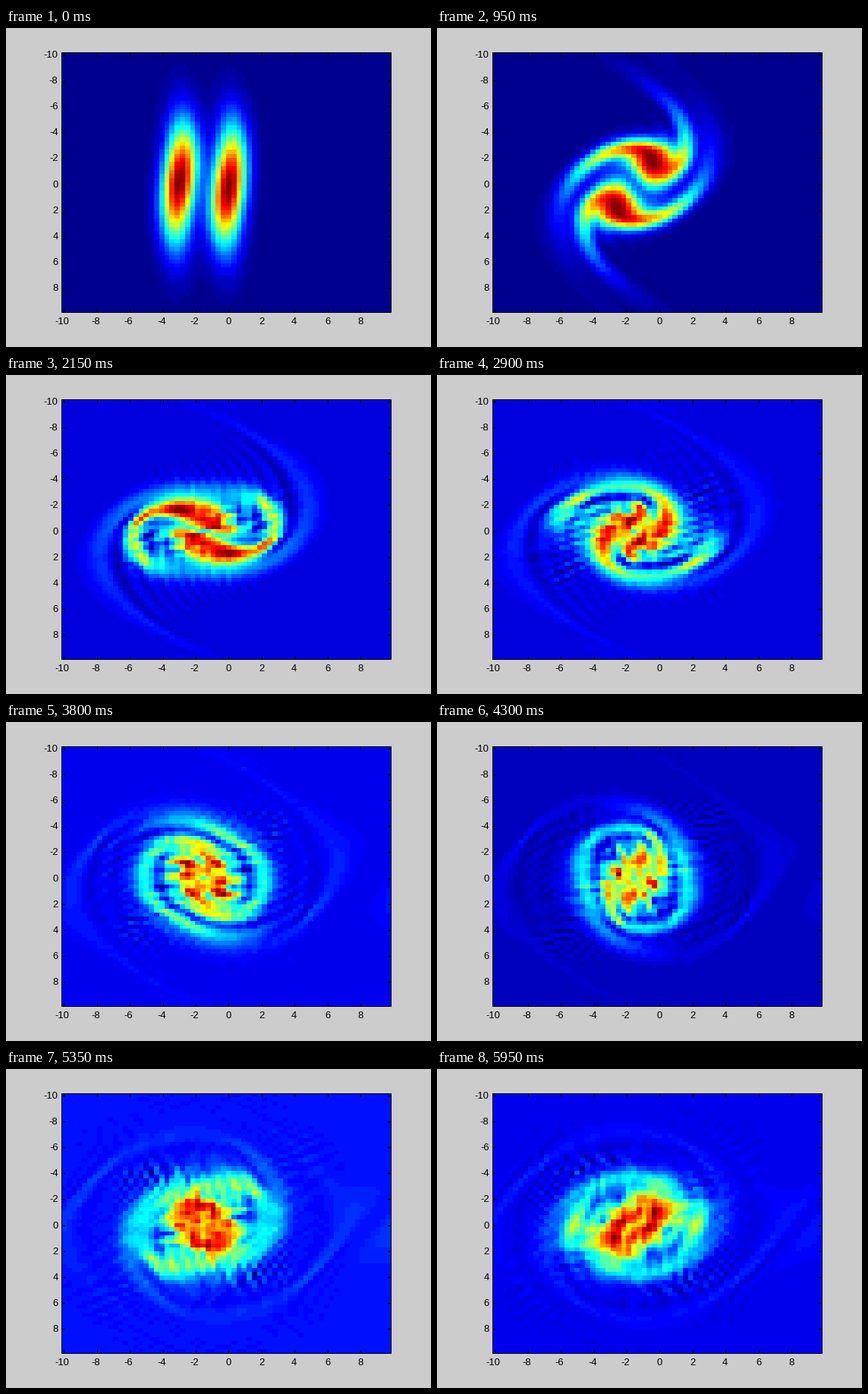
A matplotlib script that plays this animation: 560x420 px, repeating every 6 s.

```python
import numpy as np
import matplotlib.pyplot as plt
from matplotlib.animation import FuncAnimation
from matplotlib.colors import ListedColormap

W, H, DPI = 560, 420, 80
FRAMES, INTERVAL = 120, 50
PX = 72 / DPI  # points per pixel

# Vorticity equation on a periodic square
N, L, NU = 64, 20.0, 0.001
DX = L / N
DT, SUBSTEPS = 0.05, 10

grid = -L / 2 + DX * np.arange(N)
X, Y = np.meshgrid(grid, grid)

kx = 2 * np.pi * np.fft.rfftfreq(N, DX)
ky = 2 * np.pi * np.fft.fftfreq(N, DX)
k2 = kx[None, :] ** 2 + ky[:, None] ** 2
k2[0, 0] = 1.0
inv_lap = -1 / k2
inv_lap[0, 0] = 0.0


def neighbours(f):
    return (np.roll(f, -1, 1), np.roll(f, 1, 1),
            np.roll(f, -1, 0), np.roll(f, 1, 0))


def rate(w):
    psi = np.fft.irfft2(np.fft.rfft2(w) * inv_lap, s=(N, N))
    pe, pw, pn, ps = neighbours(psi)
    we, ww, wn, ws = neighbours(w)
    advect = ((pe - pw) * (wn - ws) - (pn - ps) * (we - ww)) / (4 * DX ** 2)
    return NU * (we + ww + wn + ws - 4 * w) / DX ** 2 - advect


def rk4(w):
    a = rate(w)
    b = rate(w + DT / 2 * a)
    c = rate(w + DT / 2 * b)
    d = rate(w + DT * c)
    return w + DT / 6 * (a + 2 * b + 2 * c + d)


def simulate():
    w = np.exp(-(X + 3) ** 2 - Y ** 2 / 20) + np.exp(-X ** 2 - Y ** 2 / 20)
    states = []
    for _ in range(FRAMES):
        for _ in range(SUBSTEPS):
            w = rk4(w)
        states.append(w)
    return states


def jet64():
    i = np.arange(1, 65)

    def ramp(j):
        return np.clip(np.minimum(j, 48 - j) / 16, 0, 1)

    return ListedColormap(np.column_stack([ramp(i - 24), ramp(i - 8), ramp(i + 8)]))


states = simulate()

fig = plt.figure(figsize=(W / DPI, H / DPI), dpi=DPI, facecolor="#cccccc")
ax = fig.add_axes([0, 0, 1, 1])
ax.set_axis_off()

left, right, top, bottom = 73, 507, 32, 374
img = ax.imshow(states[0], cmap=jet64(), extent=(left, right, bottom, top),
                interpolation="nearest", origin="upper", aspect="auto")
ax.set_xlim(0, W)
ax.set_ylim(H, 0)


def line(xs, ys):
    # pixel centres are given directly, so snapping would shift the line
    ax.plot(xs, ys, color="black", lw=PX, snap=False,
            solid_capstyle="projecting", solid_joinstyle="miter")


def label(x, y, v, ha):
    ax.text(x, y, str(v), ha=ha, va="baseline",
            family="Liberation Sans", size=13 * PX, color="black")


x0, x1, y0, y1 = left + 0.5, right + 0.5, top + 0.5, bottom + 0.5
line([x0, x1, x1, x0, x0], [y0, y0, y1, y1, y0])
TICK = 4
for v in range(-10, 10, 2):
    part = (v + L / 2 + DX / 2) / L
    tx = np.floor(x0 + part * (x1 - x0)) + 0.5
    ty = np.floor(y0 + part * (y1 - y0)) + 0.5
    line([tx, tx], [y1, y1 - TICK])
    line([tx, tx], [y0, y0 + TICK])
    line([x0, x0 + TICK], [ty, ty])
    line([x1, x1 - TICK], [ty, ty])
    # x labels are centred on their digits, ignoring the minus sign
    label(tx - (2.6 if v < 0 else 0.7), 390, v, "center")
    label(68.5, ty + 3.5, v, "right")


def update(k):
    w = states[k]
    img.set_data(w)
    img.set_clim(w.min(), w.max())
    return [img]


anim = FuncAnimation(fig, update, frames=FRAMES, interval=INTERVAL,
                     repeat=True, blit=False)
plt.show()
```
